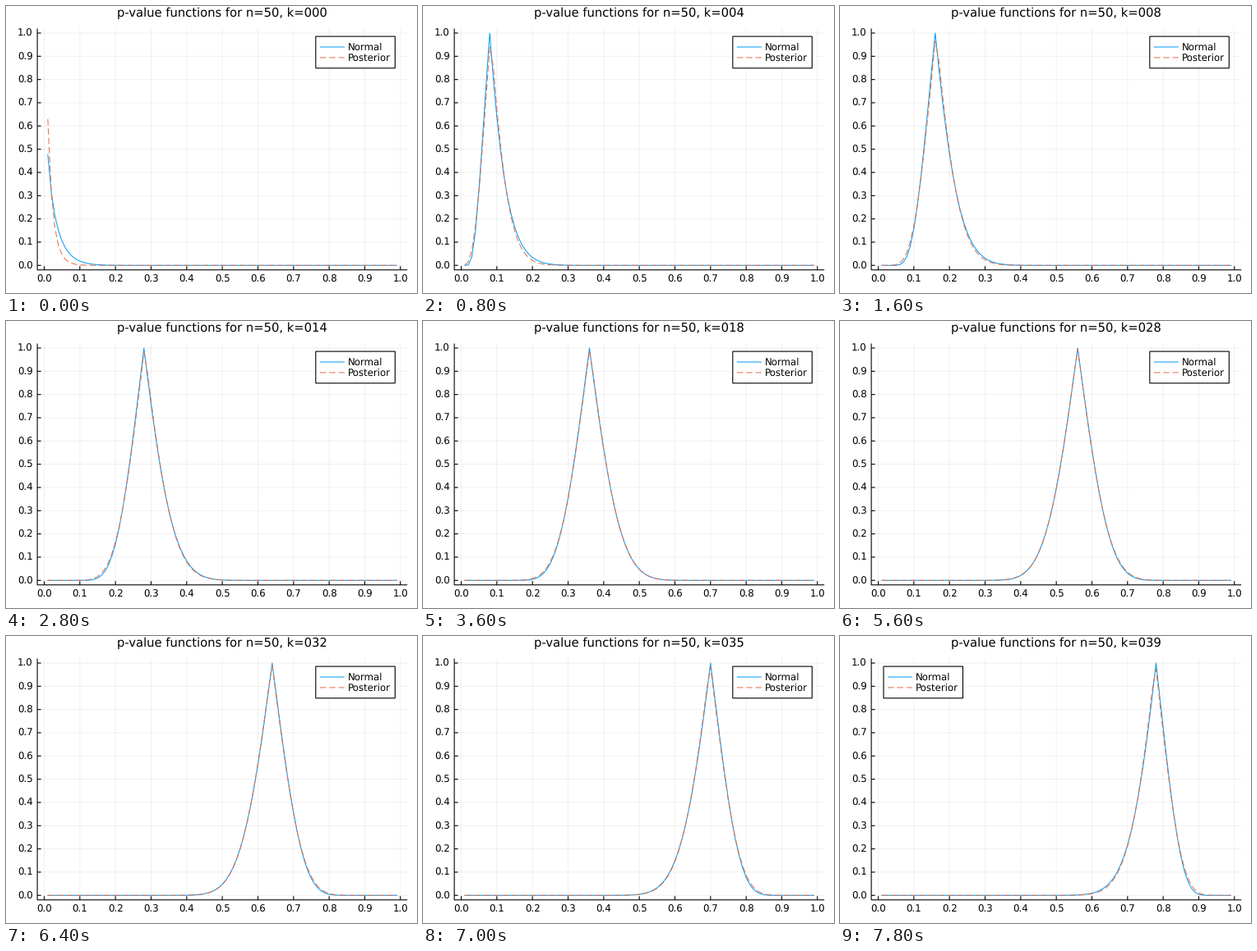
A matplotlib script that plays this animation: 500x350 px, repeating every 8 s.

```python
import math

import numpy as np
import matplotlib.pyplot as plt
from matplotlib.animation import FuncAnimation
from matplotlib.patches import Rectangle

W, H, DPI = 500, 350, 100
PX = 72 / DPI  # points per pixel
N = 50
BLUE, ORANGE = "#009AF9", "#E26F46"
LEFT, RIGHT, TOP, BOTTOM = 38.1, 488.2, 27.5, 321.8
LOW, HIGH = -0.0194, 1.0194
SMALL, LARGE = 11.7 * PX, 14.8 * PX
TICK = 4.5
ROW = 12.9  # legend row height

plt.rcParams.update({
    "font.family": "DejaVu Sans",
    "text.hinting": "none",
    "toolbar": "None",
})

p = np.arange(1, 100) / 100
theta = np.linspace(0, math.pi / 2, 8001)


def to_x(v):
    return LEFT + (v - LOW) / (HIGH - LOW) * (RIGHT - LEFT)


def to_y(v):
    return BOTTOM - (v - LOW) / (HIGH - LOW) * (BOTTOM - TOP)


def normal_pvalue(k):
    z = np.abs(k / N - p) / np.sqrt(p * (1 - p) / N)
    return np.array([math.erfc(v / math.sqrt(2)) for v in z])


def posterior_pvalue(k):
    """Two-sided tail of Beta(k + 1/2, N - k + 1/2), using p = sin(theta)^2."""
    density = np.sin(theta) ** (2 * k) * np.cos(theta) ** (2 * (N - k))
    cdf = np.concatenate([[0], np.cumsum(density[1:] + density[:-1])])
    tail = np.interp(np.arcsin(np.sqrt(p)), theta, cdf / cdf[-1])
    return 2 * np.minimum(tail, 1 - tail)


def legend_left(curves):
    """Move the legend aside once a curve enters the top right corner."""
    corner = LOW + 0.75 * (HIGH - LOW)
    crowded = any(np.any((p >= corner) & (c >= corner)) for c in curves)
    return 53 if crowded else 376.8


fig = plt.figure(figsize=(W / DPI, H / DPI), dpi=DPI, facecolor="white")
ax = fig.add_axes([0, 0, 1, 1])
ax.set_xlim(0, W)
ax.set_ylim(H, 0)
ax.axis("off")


def line(xs, ys, color="black", **style):
    style = {"lw": PX, "snap": False, **style}
    return ax.plot(xs, ys, color=color, **style)[0]


def label(x, y, text, size=SMALL, ha="left"):
    return ax.text(x, y, text, fontsize=size, ha=ha, va="baseline", zorder=6)


AXIS = {"lw": 1.1 * PX, "zorder": 2, "solid_capstyle": "butt"}
for i in range(11):
    v = i / 10
    x, y = to_x(v), to_y(v)
    line([x, x], [TOP, BOTTOM], alpha=0.06, zorder=1)
    line([LEFT, RIGHT], [y, y], alpha=0.06, zorder=1)
    line([x, x], [BOTTOM, BOTTOM - TICK], **AXIS)
    line([LEFT, LEFT + TICK], [y, y], **AXIS)
    label(x, 336.5, f"{v:.1f}", ha="center")
    label(32.5, y + 4.3, f"{v:.1f}", ha="right")
line([LEFT, LEFT, RIGHT], [TOP, BOTTOM, BOTTOM], **AXIS)

title = label((LEFT + RIGHT) / 2, 13, "", LARGE, ha="center")

STYLES = (
    ("Normal", BLUE, {}, normal_pvalue),
    ("Posterior", ORANGE, {"dashes": (7.6, 3.8)}, posterior_pvalue),
)
box = ax.add_patch(Rectangle((0, 50 - ROW), 96.5, 3 * ROW, fc="white",
                             ec="black", lw=1.1 * PX, zorder=4, snap=False))
curves, samples, names = [], [], []
for row, (name, color, style, _) in enumerate(STYLES):
    y = 50 + ROW * row
    curves.append(line([], [], color, zorder=3, **style))
    samples.append(line([0, 30], [y, y], color, zorder=5,
                        solid_capstyle="butt", **style))
    names.append(label(0, y + 4.3, name))


def update(k):
    title.set_text(f"p-value functions for n={N}, k={k:03d}")
    values = [pvalue(k) for *_, pvalue in STYLES]
    for curve, v in zip(curves, values):
        curve.set_data(to_x(p), to_y(v))
    left = legend_left(values)
    box.set_x(left)
    for sample, name in zip(samples, names):
        sample.set_xdata([left + 5, left + 35])
        name.set_x(left + 38.7)
    return [title, box, *curves, *samples, *names]


anim = FuncAnimation(fig, update, frames=40, interval=200,
                     init_func=lambda: update(0), repeat=True,
                     repeat_delay=0, blit=False)
plt.show()
```
